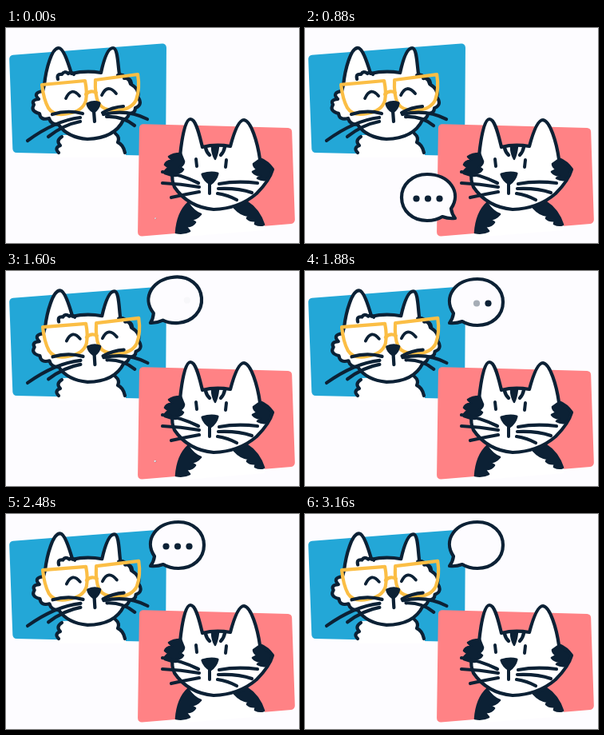
Write an HTML page with a canvas that moves like this. It is 367x269 px and loops after 3.2 s.

```html
<!DOCTYPE html>
<html lang="en">
<head>
<meta charset="utf-8">
<title>Chatting cats</title>
<style>
  html, body { margin: 0; width: 100%; height: 100%; overflow: hidden; background: #fdfcff; }
  canvas { display: block; width: 367px; height: 269px; }
</style>
</head>
<body>
<canvas id="stage"></canvas>
<script>
const W = 367, H = 269, LOOP = 3200, REPLY = 1520;
const INK = '#0c2135', WHITE = '#fff', PAPER = '#fdfcff';
const BLUE = '#23a7d7', PINK = '#ff8285', GOLD = '#fbbe45';

const canvas = document.getElementById('stage');
const ctx = canvas.getContext('2d');
const ratio = window.devicePixelRatio || 1;
canvas.width = W * ratio;
canvas.height = H * ratio;

const clamp = x => Math.min(1, Math.max(0, x));
const smooth = x => x * x * (3 - 2 * x);
const ramp = (t, from, to) => smooth(clamp((t - from) / (to - from)));

function fill(d, color) {
  ctx.fillStyle = color;
  ctx.fill(new Path2D(d));
}

function line(d, width = 4.2, color = INK) {
  ctx.strokeStyle = color;
  ctx.lineWidth = width;
  ctx.stroke(new Path2D(d));
}

function shape(d, color, width) {
  fill(d, color);
  line(d, width);
}

// Four-cornered card with softened corners.
function card(points, color) {
  const [a, b] = points;
  ctx.beginPath();
  ctx.moveTo((a[0] + b[0]) / 2, (a[1] + b[1]) / 2);
  for (let i = 1; i <= 4; i++) {
    ctx.arcTo(...points[i % 4], ...points[(i + 1) % 4], 5);
  }
  ctx.closePath();
  ctx.fillStyle = color;
  ctx.fill();
}

function leftCat(t) {
  fill('M70 134 Q63 140 67 147 Q60 151 66 157 L66 162 H150 V157 Q149 150 142 147 Q143 140 136 132 Z', WHITE);
  line('M70 136 Q62 141 68 147 Q60 150 66 156');
  line('M137 132 Q143 137 140 143 Q147 146 149 156');

  ctx.save();
  ctx.translate(105, 145);
  ctx.rotate(0.8 * ramp(t, 700, 1600) * Math.PI / 180);
  ctx.translate(-105, -145);

  shape('M48 71 C50 52 57 25 66 25 C72 25 78 44 82 57 Q100 53 119 56 ' +
        'C122 42 127 25 134 25 C140 25 140 45 142 58 Q154 61 156 70 ' +
        'Q168 77 165 86 Q172 96 162 100 Q162 107 154 107 Q153 113 147 115 ' +
        'Q136 138 102 139 Q77 137 66 121 Q56 121 54 113 Q43 116 42 107 ' +
        'Q30 104 35 96 Q31 90 41 89 Q33 81 46 79 Z', WHITE);
  line('M65 64 Q63 57 70 58 Q73 53 78 57 Q81 54 85 58');
  line('M140 59 Q148 57 148 63 Q156 62 157 69');

  line('M45 71 L99 66 Q102 80 100 91 Q96 104 78 107 Q60 111 53 100 Q47 89 45 71 Z', 4.2, GOLD);
  line('M112 65 L165 58 Q168 76 163 90 Q157 102 139 103 Q122 104 116 94 Q111 84 112 65 Z', 4.2, GOLD);
  line('M100 83 Q106 77 113 81', 4.2, GOLD);

  line('M75 88 Q82 73 92 85', 3.8);
  line('M120 84 Q127 69 138 82', 3.8);
  shape('M102 95 Q110 91 117 94 Q116 101 110 105 Q103 101 102 95 Z', INK, 3.2);
  line('M110 104 L111 117');

  line('M58 108 Q77 102 96 107');
  line('M93 112 Q61 116 27 141');
  line('M93 117 Q72 121 53 136');
  line('M121 106 Q133 99 147 98');
  line('M122 108 Q152 101 177 114');
  line('M126 111 Q146 110 161 122');
  ctx.restore();
}

function rightCat() {
  fill('M230 218 Q215 232 212 257 V262 L324 253 V247 Q318 228 298 216 Z', WHITE);
  shape('M228 219 Q215 231 213 256 Q222 258 230 254 L225 248 Q233 249 237 243 ' +
        'L231 240 Q239 239 244 233 Q235 230 228 219 Z', INK, 2.6);
  shape('M301 217 Q317 227 323 246 Q318 248 312 245 L313 241 Q306 242 302 238 ' +
        'L304 235 Q294 234 286 225 Q295 223 301 217 Z', INK, 2.6);

  shape('M218 160 C220 140 224 114 231 114 C238 114 242 133 246 149 ' +
        'Q262 145 281 148 C285 133 291 115 298 115 C307 116 315 143 318 164 ' +
        'Q328 168 334 177 Q330 191 314 207 Q292 226 260 227 ' +
        'Q228 224 211 199 Q203 181 218 160 Z', WHITE);
  shape('M219 157 Q209 157 204 161 L208 165 Q200 167 199 171 L204 175 ' +
        'Q198 178 199 182 Q206 185 213 185 L213 182 Q220 181 222 177 ' +
        'L218 174 Q223 171 223 167 Z', INK, 2.6);
  shape('M317 165 Q327 169 333 177 Q331 185 326 190 Q320 191 315 188 L319 185 ' +
        'Q312 184 309 180 L315 177 Q310 174 310 170 Z', INK, 2.6);

  shape('M258 148 L266 148 Q265 158 262 164 Q258 157 258 148 Z', INK, 2.5);
  line('M250 150 Q251 155 255 159', 4.4);
  line('M274 149 Q273 155 269 159', 4.4);

  line('M238 164 L239 173', 4);
  line('M276 165 L275 174', 4);
  shape('M246 183 Q256 180 265 182 Q263 190 256 195 Q248 190 246 183 Z', INK, 3.2);
  line('M255 194 L255 207', 4);

  line('M196 180 Q219 183 241 194');
  line('M196 194 Q219 195 242 199');
  line('M207 212 Q225 208 242 205');
  line('M267 195 Q289 191 315 194');
  line('M266 201 Q291 200 308 206');
  line('M265 207 Q278 209 289 215');
}

// The bubble grows out of its tail tip; side -1 leans left, 1 leans right.
function bubble(x, y, side, scale, turn, dots) {
  if (scale <= 0) return;
  ctx.save();
  ctx.translate(x, y);
  ctx.rotate(-side * turn * Math.PI / 180);
  ctx.scale(side * scale, scale);
  shape('M5 -13 C-9 -34 8 -56 35 -56 C54 -56 67 -43 67 -27 ' +
        'C67 -10 53 2 35 2 Q24 2 16 -3 Q8 0 0 -1 Q4 -6 5 -13 Z', PAPER, 4.2);
  ctx.fillStyle = INK;
  dots.forEach((alpha, i) => {
    ctx.globalAlpha = alpha;
    ctx.beginPath();
    ctx.arc(48.5 - 14.5 * i, -25.5, 4.1, 0, 2 * Math.PI);
    ctx.fill();
  });
  ctx.restore();
}

// Both bubbles follow the same script, with t counted from their own start.
function message(x, y, side, t, shrink) {
  const size = 1 - Math.pow(1 - clamp(t / 100), 3);
  const turn = 6 * ramp(t, 0, 110) * (1 - ramp(t, 120, 260));
  const hide = 1 - ramp(t, 1040, 1320);
  const dots = [55, 247, 440].map(from => hide * ramp(t, from, from + 280));
  bubble(x, y, side, size * shrink, turn, dots);
}

function draw(t) {
  ctx.setTransform(ratio, 0, 0, ratio, 0, 0);
  ctx.lineCap = ctx.lineJoin = 'round';
  ctx.fillStyle = PAPER;
  ctx.fillRect(0, 0, W, H);

  card([[4, 34], [201, 19], [200, 160], [8.5, 156]], BLUE);
  leftCat(t);
  card([[167, 120], [358, 125], [362, 244.5], [165, 261]], PINK);
  rightCat();

  message(188, 239, -1, t, 1 - ramp(t, 1460, 1620));
  message(181, 66, 1, t - REPLY, 1);
}

const start = performance.now();
function tick() {
  draw((performance.now() - start) % LOOP);
  requestAnimationFrame(tick);
}
tick();
</script>
</body>
</html>
```
